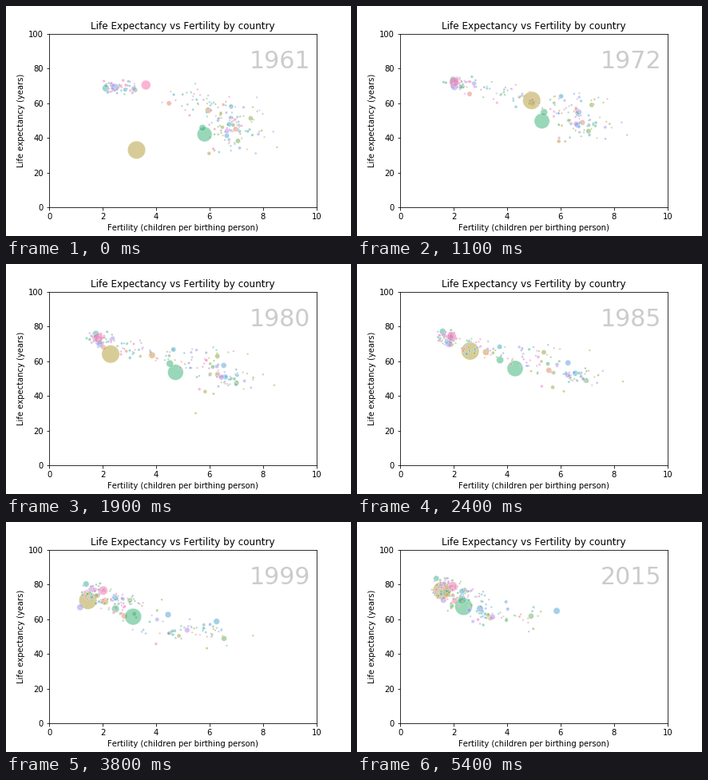
A matplotlib script that plays this animation: 432x288 px, repeating every 5.5 s.

```python
import numpy as np
import matplotlib.pyplot as plt
from matplotlib.animation import FuncAnimation
from matplotlib.colors import to_rgb

START, FRAMES = 1961, 55
YEARS = START + np.arange(FRAMES)
PASSED = np.linspace(0, 1, FRAMES)
WHEEL = ["#F77189", "#CE9032", "#97A431", "#32B166", "#36ADA4",
         "#39A7D0", "#A48CF4", "#F561DD", "#F77189"]

rng = np.random.default_rng(12)
countries = []


def wheel_color(hue):
    rgb = np.array([to_rgb(c) for c in WHEEL])
    stops = np.linspace(0, 1, len(WHEEL))
    return [np.interp(hue, stops, rgb[:, k]) for k in range(3)]


def shift(hi, lo, centre, width):
    """S-curve from hi down to lo around a centre year."""
    return lo + (hi - lo) / (1 + np.exp((YEARS - centre) / width))


def climb(first, last, power=0.9):
    return first + (last - first) * PASSED ** power


def bump(year, width):
    return np.exp(-((YEARS - year) / width) ** 2)


def through(*points):
    """Straight lines through (year, value) points."""
    return np.interp(YEARS, *zip(*points))


def add(hue, pop, growth, fert, life):
    """Store one country; pop is in millions."""
    countries.append((hue, pop * growth ** PASSED, fert, life))


def add_small(median, growth, fert, life):
    pop = min(median * rng.lognormal(0, 1.25), 45)
    add(rng.random(), pop, growth, fert, life)


# The largest countries: China, India, United States
add(0.19, 660, 2.08,
    through((1961, 3.27), (1963, 7.3), (1972, 4.92), (1980, 2.3),
            (1982, 2.8), (1991, 2.26), (1999, 1.45), (2015, 1.56)),
    through((1961, 33), (1963, 50), (1972, 61.5), (1980, 64), (2015, 76.4)))
add(0.40, 457, 2.87, shift(6.25, 2.0, 1987, 12), climb(42, 67.2, 0.75))
add(0.95, 184, 1.74,
    through((1961, 3.62), (1972, 2.02), (1976, 1.75), (1991, 2.05),
            (2015, 1.97)),
    climb(70.4, 79, 1))

# Japan, Russia, Indonesia, Brazil
add(0.46, 94, 1.35, shift(2.15, 1.35, 1980, 6), climb(68.6, 83.4, 0.7))
add(0.73, 121, 1.19,
    through((1961, 2.46), (1972, 2.03), (1991, 1.73), (1999, 1.16),
            (2015, 1.62)),
    climb(69, 71) - 4 * bump(2001, 7))
add(0.41, 90, 2.87, shift(5.8, 2.3, 1983, 5.5), climb(45.7, 71, 0.65))
add(0.12, 74, 2.78, shift(6.6, 1.65, 1978, 9), climb(55.8, 75.2))

# Pakistan, Nigeria, Bangladesh, Mexico
add(0.66, 46, 4.1, shift(6.75, 2.8, 1997, 6), climb(47.8, 66, 0.6))
add(0.64, 46, 3.9, shift(6.65, 5.7, 2002, 8), climb(41.2, 64.7, 0.85))
add(0.065, 50, 3.2, shift(7, 2, 1990, 5.5), climb(45, 70.6, 1.2))
add(0.58, 39, 3.25, shift(7, 2.3, 1980, 6), climb(58, 76, 0.7))

# Sudden losses of life: Cambodia, Rwanda, Haiti
add(0.175, 6, 2.6, shift(6.4, 2.6, 1988, 7),
    climb(42, 68) - 32 * bump(1978, 3.3))
add(0.745, 3, 3.8, shift(8.4, 3.9, 1994, 6),
    climb(43.5, 66) - 46 * bump(1994, 1.3))
add(0.38, 4, 2.7, shift(6.3, 2.6, 1992, 9),
    climb(42, 64.5) - 30 * bump(2010, 0.5))

# Early low fertility
for _ in range(40):
    wave = 0.08 * np.sin(YEARS / rng.uniform(2.5, 5) + rng.uniform(0, 6))
    fert = shift(rng.uniform(2.1, 3.4), rng.uniform(1.25, 1.95),
                 rng.normal(1973, 4), 5)
    end = np.clip(rng.normal(79.5, 3), 72, 83.5)
    add_small(4, 1.3, fert + wave, climb(rng.normal(69.5, 2), end))

# Fertility falling within the period
for _ in range(78):
    centre = rng.uniform(1962, 1994)
    delay = centre - 1962
    fert = shift(rng.normal(6.8, 0.55), max(1.35, rng.normal(2.1, 0.45)),
                 centre, rng.uniform(5.5, 8))
    life = climb(65 - 0.6 * delay + rng.normal(0, 4.5),
                 77 - 0.2 * delay + rng.normal(0, 3), 0.75)
    add_small(2.2, 2.4, fert, life)

# Late fall, with a dip in life expectancy in the nineties
for _ in range(46):
    centre = rng.uniform(1994, 2022)
    delay = centre - 1994
    fert = shift(rng.normal(6.95, 0.55), rng.normal(2.4, 0.3),
                 centre, rng.uniform(7, 10))
    life = climb(max(31, rng.normal(44, 5) - 0.2 * delay),
                 rng.normal(63.5, 3.5) - 0.1 * delay)
    add_small(3, 2.8, fert, life - rng.uniform(0, 8) * bump(1997, 8))

# Healthy countries with large families
for _ in range(6):
    add_small(0.8, 6, shift(rng.normal(7.5, 0.4), 2.5, rng.normal(1992, 4), 5),
              climb(rng.normal(53, 4), 76, 0.6))

# Deep dip after the turn of the century
for _ in range(5):
    add_small(2, 2.2, shift(6.5, rng.uniform(2.4, 3.8), 1985, 8),
              climb(51, 64) - rng.uniform(11, 17) * bump(2005, 8))

countries.sort(key=lambda c: c[0])
hues, pops, ferts, lives = (np.array(part) for part in zip(*countries))
colors = [wheel_color(hue) for hue in hues]

plt.rcParams.update({"font.family": "DejaVu Sans", "font.size": 10,
                     "text.kerning_factor": 6})
fig, ax = plt.subplots(figsize=(6, 4), dpi=72)
fig.subplots_adjust(left=0.125, right=0.9, bottom=0.125, top=0.88)
ax.set(xlim=(0, 10), ylim=(0, 100),
       xlabel="Fertility (children per birthing person)",
       ylabel="Life expectancy (years)")
ax.set_title("Life Expectancy vs Fertility by country", fontsize=12)
dots = ax.scatter(ferts[:, 0], lives[:, 0], c=colors, alpha=0.5,
                  edgecolors="white", linewidths=0.7)
label = ax.text(7.5, 80, "", fontsize=30, color="grey", alpha=0.4)


def draw(i):
    share = pops[:, i] / pops[:, i].max()
    dots.set_offsets(np.column_stack([ferts[:, i], lives[:, i]]))
    dots.set_sizes(5 + 495 * share)
    label.set_text(str(START + i))
    return dots, label


anim = FuncAnimation(fig, draw, frames=FRAMES, interval=100, repeat=True)
plt.show()
```
